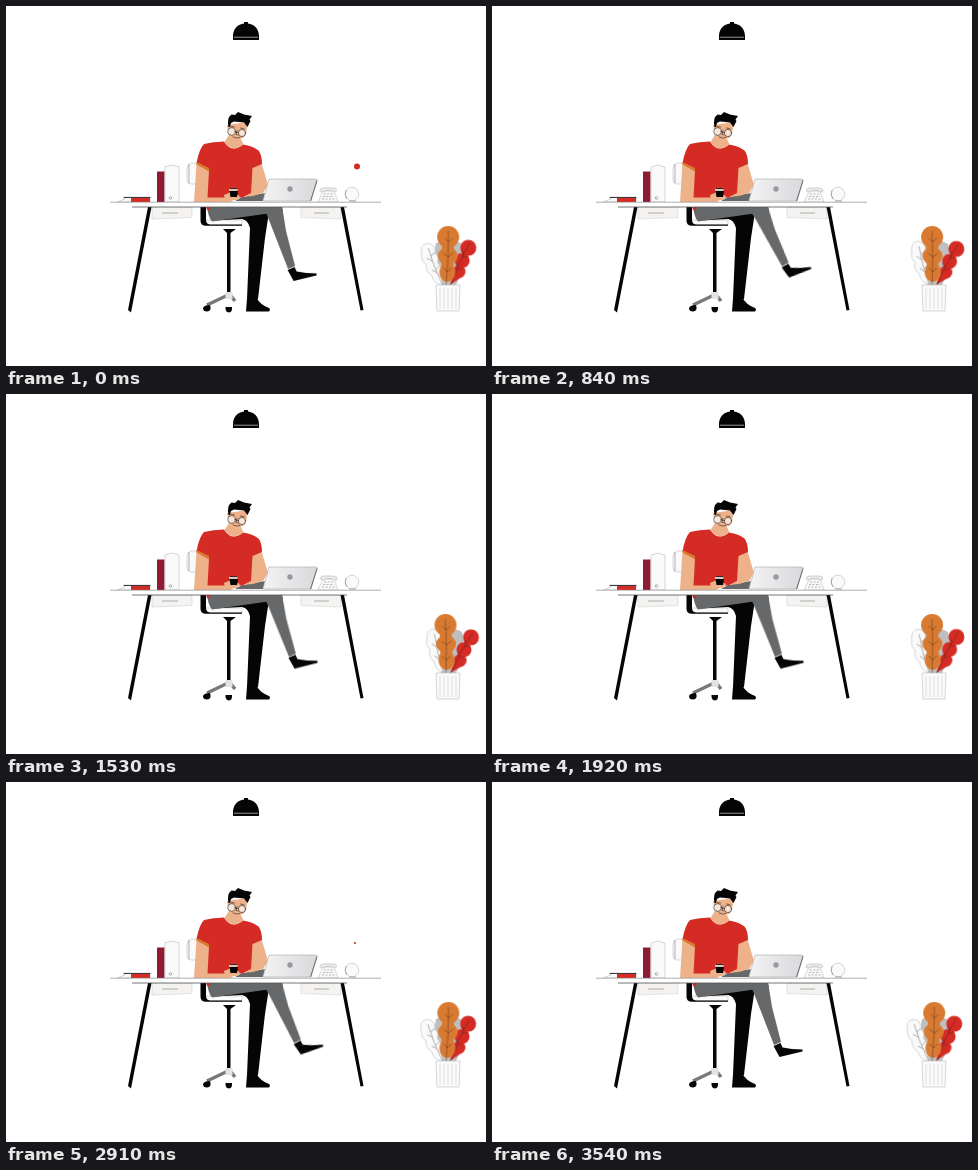
Write an HTML page that moves like this. It is 480 px wide and 360 px high and loops after 3.57 s.

```html
<!DOCTYPE html>
<html lang="en">
<head>
<meta charset="utf-8">
<title>Coffee at the desk</title>
<style>
  html, body { margin: 0; width: 100%; height: 100%; overflow: hidden; background: #fff; }
  svg { display: block; width: 100vw; height: 100vh; }
  :root { --sine: cubic-bezier(.364, 0, .636, 1); }

  .shin { transform-origin: 268px 204px; animation: kick 892.5ms var(--sine) -60ms infinite alternate; }
  .leaf { transform-origin: 441px 282px; animation: sway 1785ms var(--sine) -385ms infinite alternate; }
  .phone { transform-origin: 322px 196px; animation: ring 297.5ms var(--sine) infinite alternate; }
  .spark { animation: spark 3570ms step-end infinite; }
  .spot { animation: spot 1785ms step-end infinite; }

  @keyframes kick { to { transform: rotate(-8deg); } }
  @keyframes sway {
    from { transform: rotate(calc(var(--a) * -1)); }
    to { transform: rotate(var(--a)); }
  }
  @keyframes ring { from { transform: rotate(-1.5deg); } to { transform: rotate(1.5deg); } }
  @keyframes spark { 0% { opacity: 1; } 1.7%, 100% { opacity: 0; } }
  @keyframes spot { 0%, 68% { opacity: 0; } 61% { opacity: 1; } }

  .k { fill: #050505; }
  .red { fill: #d52b25; }
  .orange { fill: #d87a31; }
  .skin { fill: #edb28a; }
  .gray { fill: #66686a; }
  .pale { fill: #fafafa; stroke: #c4c4c4; stroke-width: .7; }
  .drawer { fill: #f4f3f1; stroke: #d2d2d0; stroke-width: .6; }
  .thin { fill: none; stroke: #8d8d8d; stroke-width: .7; }
  .ink { fill: none; stroke: #111; stroke-width: .8; stroke-linecap: round; }
  .vein { fill: none; stroke: #3a1a10; stroke-width: .6; opacity: .65; }
</style>
</head>
<body>
<svg viewBox="0 0 480 360">
  <defs>
    <linearGradient id="lid"><stop stop-color="#f3f3f4"/><stop offset="1" stop-color="#d8d9db"/></linearGradient>
  </defs>

  <!-- lamp -->
  <path class="k" d="M227 34V30C227 23 232 18 238 17.500V16h4v1.500C248 18 253 23 253 30v4Z"/>
  <path d="M228 31.200h24" stroke="#bbb" stroke-width=".8"/>

  <!-- chair -->
  <path class="pale" d="M191 157h-6q-4 1-4 6v11q0 4 4 4h6"/>
  <path class="thin" d="M183 158v19"/>
  <path class="pale" d="M200 214h36v5h-36Z"/>
  <path class="k" d="M194.500 201h5.500v13q0 4 4 4.500h32v1.300h-36q-5.500 0-5.500-5ZM217 223h13l-5.500 4v61h-3.500v-61Z"/>
  <path d="M221 289.500L201 299M225 290L229 295" fill="none" stroke="#77797c" stroke-width="3.500"/>
  <path d="M219.500 286h7v7h-7Z" fill="#e2e3e5"/>
  <path class="k" d="M197 302q1-3 7-3 2 6-3 6.500-4 0-4-3.500ZM219.500 301h6.500q.5 5-3 5.500-4-.5-3.500-5.500Z"/>

  <!-- legs -->
  <path class="k" d="M208 214.500Q235 206 263 206L259 232 252 293H241L244 222Q242 214 236 213Z"/>
  <path class="k" d="M241 292.500h10q3 6 12 9.500 2 1.500 0 3.500H240Z"/>
  <g class="shin">
    <path class="gray" d="M258 204Q268 197 276.500 203L280 225 289 260 282 263 261 209Z"/>
    <path class="k" d="M281.500 264l7-3 2 4.500q9 2 20 2v2l-23 5.500Z"/>
  </g>
  <path class="gray" d="M201 200H276L277 205 262 207.500 206 215.500Q202 211 201 200Z"/>
  <path class="red" d="M200 200h3.500l.5 4.500-3-.5Z"/>

  <!-- drawers and legs of the desk -->
  <path class="drawer" d="M146 201h40v10.500l-40 1.500ZM295 201h40v12l-40-1.500Z"/>
  <path class="thin" d="M156 207h16M308 207h15"/>
  <path class="k" d="M142 201h3.500L125 306.500 122 304ZM334.500 201h3.500L357.500 304l-3 .5Z"/>

  <!-- shelf items -->
  <path class="pale" d="M118 191h26v5h-33l8-3Z"/>
  <path class="red" d="M125 192h19v4h-19Z"/>
  <path class="ink" d="M118 191.500h26"/>
  <path d="M151 165.500h7.500V196H151Z" fill="#8f1b33"/>
  <path class="pale" d="M159 161l7-2 7 2v35h-14Z"/>
  <circle class="thin" cx="164.500" cy="192" r="1.300"/>

  <!-- man -->
  <path class="gray" d="M229 195l7-4 23-4-2 8Z"/>
  <path class="skin" d="M245 160L255.500 157 262 179 257 187 247 190 236 191 243 186Z"/>
  <path class="skin" d="M190.500 157l13 5-1 24 20 3 7 4-5 3H188Z"/>
  <path class="red" d="M198 138Q207 135.500 218 135.500 226 148 237 138.500 247 140 252.500 144.500 256 149 256 158L246.500 162 245 187 236 191.500H201.500L203 165 190.500 157.500Q193 143 198 138Z"/>
  <path class="orange" d="M190.500 156l12.500 6v3.500l-12.500-7Z"/>
  <path class="skin" d="M218.500 136L223 129 221 119 242 116 240 128Q238 133 234.500 132L237.500 138.500Q226 147 218.500 136Z"/>
  <path class="k" d="M222.500 121Q220.500 112 225.500 108.500L229 109 232 106 238 108.500 246 110 243.500 113.500 244.500 115 241.500 121 238 116.500 228 115.500 225 117 224 121Z"/>
  <g fill="#fff" fill-opacity=".65" stroke="#222" stroke-width=".6" stroke-linecap="round">
    <circle cx="225.500" cy="125.500" r="3.800"/><circle cx="236" cy="127" r="3.600"/>
    <path fill="none" d="M229.500 126l3 .5M225 120.500l3.500.5M234.500 122l3.500.7M231 124.500l-1 4 2 .4M227 131q4 2 7 .5"/>
  </g>
  <path class="skin" d="M218 189l7-3 9 4-3 4h-12Z"/>
  <path class="k" d="M223.500 185h8.500l-1 6h-6.500Z"/>
  <path d="M223 182.500h8.500v2.500H223Z" fill="#dcc8b8"/>
  <path class="ink" d="M224 182.500h7"/>

  <!-- laptop -->
  <path d="M263 173h47q1.500 0 1 2l-6 20h-48Z" fill="url(#lid)" stroke="#aaaaac" stroke-width=".6"/>
  <path d="M311 174.500l-6.500 20.500" stroke="#555" stroke-width=".8"/>
  <circle cx="284" cy="183" r="2.700" fill="#999a9d"/>

  <!-- phone and ornament -->
  <g class="phone">
    <path class="pale" d="M317 185h11l4 11h-20Z"/>
    <path d="M314 185q0-3 4-3h9q4 0 4 3l-3 1-2-1.500h-6l-3 1.500Z" fill="#eee" stroke="#b0b0b0" stroke-width=".6"/>
    <path class="thin" stroke-dasharray="2 1.500" d="M318 188h9M317 190.500h11M316 193h13"/>
  </g>
  <circle class="pale" cx="346" cy="188" r="6.800"/>
  <path class="thin" d="M340 184q-2 5 1 9M343 195h7"/>
  <circle class="red spark" cx="351" cy="160.500" r="3"/>
  <circle class="red spot" cx="349" cy="161" r="1.100"/>

  <!-- desk top -->
  <path d="M104 196H375L340 201H126Z" fill="#fff"/>
  <path class="thin" d="M104 196.200H375"/>
  <path d="M126 201H341" stroke="#555" stroke-width=".8"/>

  <!-- plant -->
  <path d="M430 237q14-6 26 1 3 10-2 18 3 10-4 23h-15q-6-10-3-22-5-9-2-20Z" fill="#bfbfbf"/>
  <g class="leaf" style="--a:5deg">
    <path class="pale" d="M437 279Q428 277 427 269 420 264 422 257 417 254 418 248 416 237 424 236 433 237 431 246 436 250 433 256 439 262 436 267Z"/>
    <path class="thin" d="M425 241Q429 260 437 279M427 249l4-3M428 254l-5-3M431 263l4-4M432 266l-5-3"/>
  </g>
  <g class="leaf" style="--a:2.200deg">
    <g class="red">
      <circle cx="463.500" cy="242.500" r="8"/><circle cx="457" cy="255" r="7.500"/><circle cx="453.500" cy="266" r="6.500"/>
      <path d="M444 279l5-14 6 7Z"/>
    </g>
    <path class="vein" d="M465 238Q453 257 445 279M458 250v-5M457 252l6-1M452 262l-1-4M452 264l5-2"/>
  </g>
  <g class="leaf" style="--a:-1.700deg">
    <g class="orange">
      <circle cx="441" cy="231" r="11"/><ellipse cx="441" cy="250" rx="10" ry="9"/><ellipse cx="441" cy="266" rx="8" ry="10"/>
      <path d="M435 236h12v25h-12Z"/>
    </g>
    <path class="vein" d="M441 225Q442 252 440 280M441.500 236l4-4M441.500 236l-4-4M441.500 251l5-4M441.500 251l-5-4M441 266l4-4M441 266l-4-4"/>
  </g>
  <path class="pale" d="M430 279h24l-1 26h-22Z"/>
  <path class="thin" opacity=".35" d="M434 282v21M438 282v21M442 282v21M446 282v21M450 282v21"/>
</svg>
</body>
</html>
```
